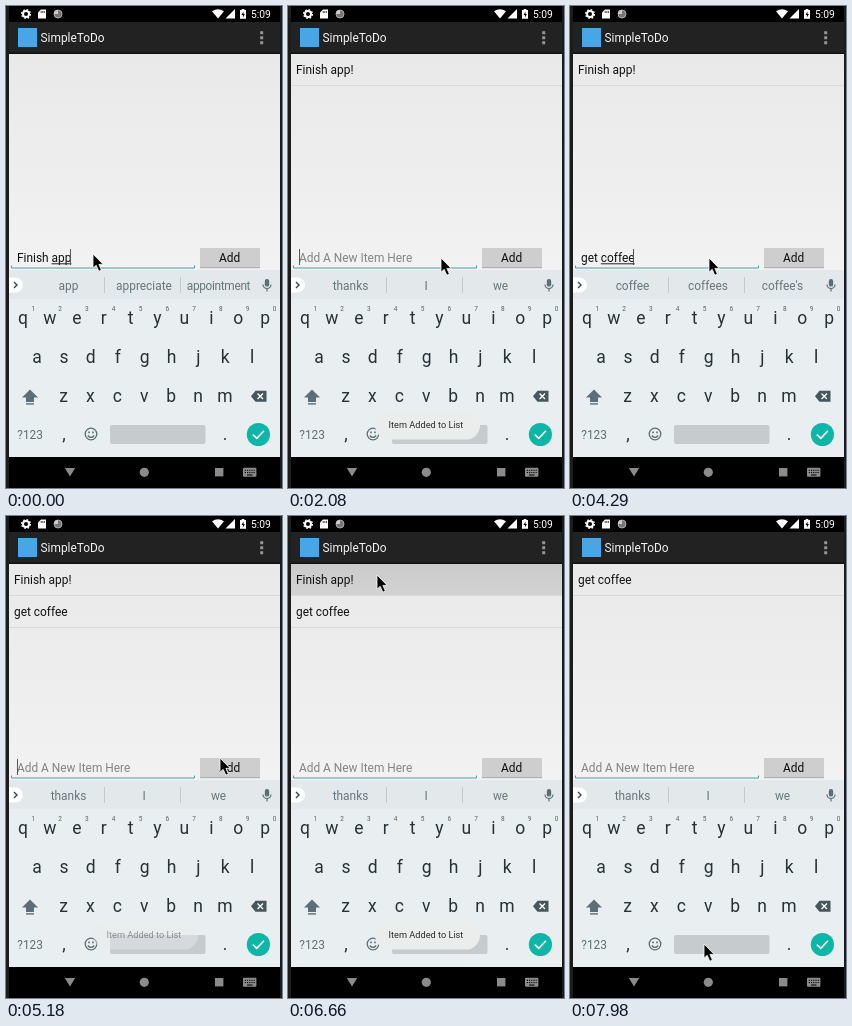
Recreate the animation shown at these times as an HTML page. Size 276x482 px, loop 8000 ms.

```html
<!DOCTYPE html>
<html lang="en">
<head>
<meta charset="utf-8">
<title>To-do list demo</title>
<style>
html, body { margin: 0; width: 100%; height: 100%; overflow: hidden; background: #000; }
svg { display: block; width: 276px; height: 482px; }
text { font-family: Roboto, sans-serif; font-size: 11.9px; fill: #111; white-space: pre; }
.mid { text-anchor: middle; }
.key { font-size: 17.5px; fill: #263238; text-anchor: middle; }
.num { font-size: 6.5px; fill: #52636c; text-anchor: middle; }
.hint { fill: #858585; }
.sug { fill: #66777f; text-anchor: middle; }
</style>
</head>
<body>
<svg viewBox="0 0 276 482">
  <defs>
    <linearGradient id="paper" x2="0" y2="1">
      <stop stop-color="#e9e9e9"/><stop offset="1" stop-color="#f2f2f2"/>
    </linearGradient>
    <linearGradient id="press" x2="0" y2="1">
      <stop stop-color="#cbcbcb"/><stop offset="1" stop-color="#d2d2d2"/>
    </linearGradient>
  </defs>
  <rect width="276" height="482" fill="#1c1c1c"/>
  <rect x="3" width="271" height="482" fill="#000"/>

  <!-- status bar -->
  <g fill="#fff">
    <circle cx="20" cy="8" r="3" fill="none" stroke="#fff" stroke-width="2"/>
    <circle cx="20" cy="8" r="4.4" fill="none" stroke="#fff" stroke-width="1.3" stroke-dasharray="1.7 1.75"/>
    <path d="M35 3.5H40V12.5H32V6.5Z"/>
    <path d="M35.2 5v2M36.8 5v2M38.4 5v2" stroke="#000" stroke-width=".7"/>
    <circle cx="52" cy="8" r="4" fill="#777" stroke="#aaa"/>
    <path d="M52 8V4A4 4 0 0 0 48 8Z" fill="#ccc"/>
    <path d="M206 5.2Q212 1.2 218 5.2L212 12.5Z"/>
    <path d="M229 3V12.5H219.5Z"/>
    <path d="M235.7 3h2.6v1.1h1.7v8.6h-6V4.1h1.7Z"/>
    <path d="M237.5 5.5 235.5 9h1.4v2.5l2-3.6h-1.4Z" fill="#000"/>
    <text x="245" y="12" style="font-size:10.3px;fill:#fff">5:09</text>
  </g>

  <!-- action bar -->
  <rect x="3" y="16" width="271" height="32" fill="#222"/>
  <rect x="3" y="46.5" width="271" height="1.5" fill="#111"/>
  <rect x="12" y="22" width="19" height="19" fill="#48a5e6"/>
  <text x="34.5" y="36" style="fill:#f3f3f3">SimpleToDo</text>
  <path d="M254.2 25.2h3v3h-3zM254.2 30.2h3v3h-3zM254.2 35.2h3v3h-3z" fill="#969696"/>

  <!-- list -->
  <rect x="3" y="48" width="271" height="216" fill="url(#paper)"/>
  <rect id="pressed" x="3" y="48" width="271" height="31" fill="url(#press)"/>
  <g id="list"></g>

  <!-- input row -->
  <path d="M5.5 259.5V262H188.5V259.5" fill="none" stroke="#4c9ea4"/>
  <text id="input" x="11" y="256"></text>
  <rect id="under" y="257.3" height="1" fill="#222"/>
  <rect id="caret" y="243" width="1" height="16" fill="#555"/>
  <rect id="button" x="194" y="242" width="60" height="20" rx="1"/>
  <rect x="194" y="261.2" width="60" height="1" fill="#aaa"/>
  <text x="223.6" y="256.3" class="mid">Add</text>

  <!-- keyboard -->
  <rect x="3" y="264" width="271" height="187" fill="#e9eef0"/>
  <rect x="3" y="264" width="271" height="29" fill="#e3e8ea"/>
  <path d="M98.5 271V287M174.5 271V287" stroke="#c3cacd"/>
  <path d="M3 271.5H9.5A7.5 7.5 0 0 1 9.5 286.5H3Z" fill="#fff"/>
  <path d="M8 276 11 279 8 282" fill="none" stroke="#37474f" stroke-width="1.4"/>
  <g id="sugs"></g>
  <g fill="none" stroke="#5c6e77" stroke-width="1.2">
    <rect x="259.4" y="273.6" width="3.2" height="6.4" rx="1.6" fill="#5c6e77"/>
    <path d="M257 278.5A4 4 0 0 0 265 278.5M261 282.5V285.5"/>
  </g>
  <g id="keys"></g>
  <path d="M24 383.5 32 391.5H28V396H20V391.5H16Z" fill="#5c6e77"/>
  <rect x="20" y="397.2" width="8" height="1.4" fill="#5c6e77"/>
  <path d="M249.5 384.8H260.5V395.8H249.5L245 390.3Z" fill="#46565e"/>
  <path d="M251.5 387.5 257 393M257 387.5 251.5 393" stroke="#fff" stroke-width="1.3"/>
  <text x="11.3" y="432.5" style="fill:#5c6e77">?123</text>
  <g fill="none" stroke="#5c6e77" stroke-width="1.3">
    <circle cx="85" cy="428" r="5.8"/>
    <path d="M81.8 429.5Q85 433.4 88.2 429.5"/>
    <path d="M82.2 426.3h1.6M86.2 426.3h1.6" stroke-width="1.7"/>
  </g>
  <rect x="104" y="419" width="95.5" height="19" rx="2" fill="#c6cbce"/>
  <circle cx="252.4" cy="428.5" r="11.6" fill="#0db6a6"/>
  <path d="M246.8 428.6 250.8 432.4 258 424.8" fill="none" stroke="#fff" stroke-width="1.6"/>

  <!-- navigation bar -->
  <g fill="#8b8b8b">
    <path d="M58.8 462H69.2L64 470.6Z"/>
    <circle cx="138.3" cy="466.3" r="4.6"/>
    <rect x="209" y="462" width="8.4" height="8.4"/>
    <rect x="237" y="461.8" width="13.4" height="9" rx="1"/>
    <path d="M238.8 464.3H249M238.8 466.6H249" stroke="#000" stroke-dasharray="1.2 1"/>
    <path d="M241 469H246.5" stroke="#000"/>
  </g>

  <g id="toast">
    <rect x="87" y="405" width="105" height="28.6" rx="14.3" fill="#ebeded"/>
    <text x="100.6" y="422.3" style="font-size:9.2px;fill:#2c2c2c">Item Added to List</text>
  </g>
  <path id="mouse" d="M0 0V14.2L3.2 11.3 5.8 17.2 8.4 16.1 5.9 10.4H10.2Z" fill="#000" stroke="#fff" stroke-width=".8"/>
</svg>

<script>
const LOOP = 8000;
const $ = id => document.getElementById(id);
const NS = "http://www.w3.org/2000/svg";

function add(parent, tag, attrs, text = "") {
  const el = document.createElementNS(NS, tag);
  for (const k in attrs) el.setAttribute(k, attrs[k]);
  el.textContent = text;
  parent.appendChild(el);
  return el;
}

function keyRow(letters, x, y) {
  [...letters].forEach((c, i) =>
    add($("keys"), "text", { x: x + i * 26.9, y, class: "key" }, c));
}
keyRow("qwertyuiop", 17, 318);
keyRow("asdfghjkl", 31, 357);
keyRow("zxcvbnm", 57.5, 396);
keyRow(",", 58, 434);
keyRow(".", 219, 434);
[..."1234567890"].forEach((c, i) =>
  add($("keys"), "text", { x: 27.3 + i * 26.8, y: 304.5, class: "num" }, c));

const sugs = [62.5, 138, 212.5].map(x => add($("sugs"), "text", { x, y: 283.5, class: "sug" }));
const rows = [0, 1].map(i => ({
  text: add($("list"), "text", { x: 8, y: 68 + i * 32 }),
  line: add($("list"), "rect", { x: 3, y: 79 + i * 32, width: 271, height: 1, fill: "#d9d9d9" })
}));

// Tracks of [start, value...]; each value holds until the next start.
const IDLE = "thanks I we";
const typed = [
  [0, "Finish app", "app appreciate appointment"],
  [150, "Finish app!", IDLE],
  [1640, "", IDLE],
  [2670, "g", "g good get"],
  [2820, "ge", "ge get getting"],
  [2970, "get", "get getting gets"],
  [3110, "get ", "the a it"],
  [3560, "get c", "c caught coffee"],
  [3710, "get co", "co coffee could"],
  [3850, "get cof", "cof coffee coffees"],
  [4000, "get coff", "coff coffee coffees"],
  [4140, "get coffe", "coffe coffee coffees"],
  [4290, "get coffee", "coffee coffees coffee's"],
  [5030, "", IDLE]
];
const items = [[0], [1640, "Finish app!"], [5030, "Finish app!", "get coffee"], [7100, "get coffee"]];
const caretOn = [[0, 1], [750, 0], [1050, 1], [2220, 0], [2670, 1], [4880, 0],
  [5030, 1], [5620, 0], [6060, 1], [6660, 0], [7100, 1], [7690, 0]];
const mouse = [
  [0, 87, 248], [1050, 110, 240], [1200, 170, 234], [1350, 212, 246],
  [1930, 185, 250], [2080, 153, 252], [2220, 143, 253], [2370, 139, 252],
  [4590, 150, 252], [4740, 193, 247], [4880, 214, 242],
  [5470, 165, 172], [5620, 85, 95], [5770, 87, 87],
  [6060, 89, 78], [6210, 90, 66], [6360, 89, 59],
  [7250, 92, 72], [7400, 102, 125], [7540, 118, 220], [7690, 133, 326],
  [7840, 134, 414], [7980, 134, 428]
];
const at = (track, t) => track.findLast(k => k[0] <= t);

const STEP = 148;
const clamp = v => Math.max(0, Math.min(1, v));
function toastAlpha(t, start) {
  const q = Math.floor((t + 1) / STEP) * STEP;
  return Math.min(clamp((q - start) / 400), clamp((start + 2660 - q) / 500));
}

function drawInput(t) {
  const [, value, words] = at(typed, t);
  const input = $("input");
  input.textContent = value || "Add A New Item Here";
  input.setAttribute("class", value ? "" : "hint");
  const width = n => n ? input.getSubStringLength(0, n) : 0;
  const end = width(value.length);
  const word = /[a-z]+$/.exec(value);
  const from = word ? width(word.index) : end;
  $("under").setAttribute("x", 11 + from);
  $("under").setAttribute("width", end - from);
  $("caret").setAttribute("x", Math.max(11, Math.floor(10.4 + end)));
  $("caret").setAttribute("opacity", at(caretOn, t)[1]);
  words.split(" ").forEach((w, i) => {
    sugs[i].textContent = w;
    sugs[i].style.letterSpacing = w.length > 10 ? "-.35px" : "0";
  });
}

function draw(t) {
  drawInput(t);
  const list = at(items, t).slice(1);
  rows.forEach(({ text, line }, i) => {
    text.textContent = list[i] || "";
    line.setAttribute("opacity", list[i] ? 1 : 0);
  });
  $("pressed").setAttribute("opacity", t >= 6660 && t < 7100 ? 1 : 0);
  $("button").setAttribute("fill", t >= 1500 && t < 1640 ? "#b8b8b8" : "#cecece");
  $("toast").setAttribute("opacity", Math.max(toastAlpha(t, 1600), toastAlpha(t, 5000)));
  const [, x, y] = at(mouse, t);
  $("mouse").setAttribute("transform", `translate(${x} ${y})`);
}

const begin = performance.now();
function tick() {
  draw((performance.now() - begin) % LOOP);
  requestAnimationFrame(tick);
}
draw(0);
requestAnimationFrame(tick);
</script>
</body>
</html>
```
